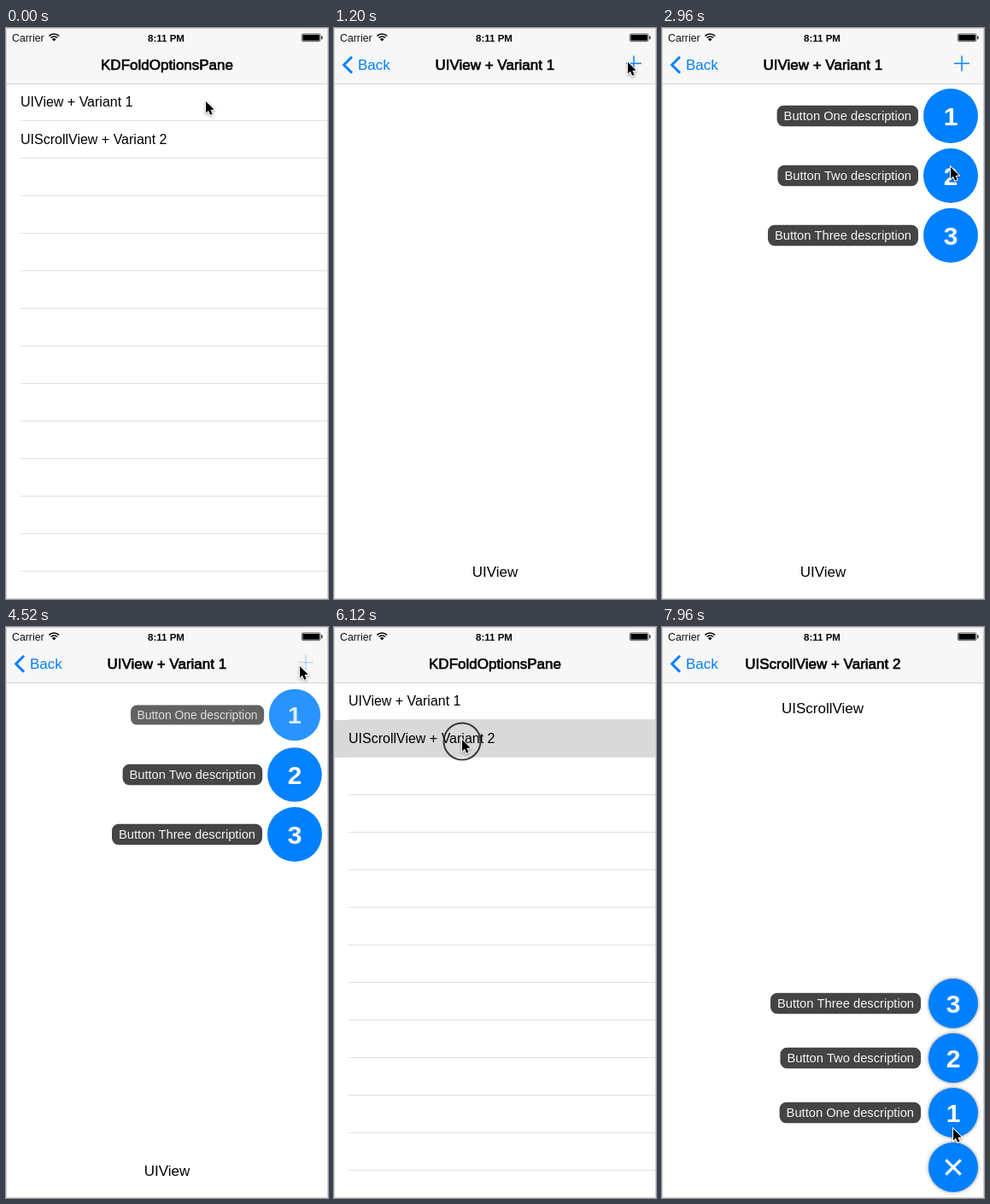
Write an HTML page with a canvas that moves like this. It is 377 px wide and 669 px high and loops after 8 s.

```html
<!DOCTYPE html>
<html lang="en">
<head>
<meta charset="utf-8">
<title>Plus buttons demo</title>
<style>
html, body { margin: 0; width: 100%; height: 100%; overflow: hidden; background: #fff; }
canvas { display: block; }
</style>
</head>
<body>
<canvas id="stage" width="377" height="669"></canvas>
<script>
const W = 377, H = 669, LOOP = 8000;
const BLUE = '#0080ff', PRESSED = '#3399ff', FONT = '"Liberation Sans", Arial, sans-serif';
const ctx = document.getElementById('stage').getContext('2d');

const clamp = v => Math.min(1, Math.max(0, v));
const lerp = (a, b, p) => a + (b - a) * p;
const smooth = p => p * p * (3 - 2 * p);
const ramp = (t, start, length) => clamp((t - start) / length);
const ease = (t, start, length) => smooth(ramp(t, start, length));

// Critically damped spring used by the page transitions
function spring(t, start) {
  const x = Math.max(0, t - start) * 0.01826;
  return 1 - (1 + x) * Math.exp(-x);
}

const PUSH_A = 300, POP = 5308, PUSH_B = 6194;
const OPEN_A = 1480, CLOSE_A = 4445, OPEN_B = 7400;

// Pointer path: time, x, y
const PATH = [
  [0, 234, 86], [340, 234, 86], [1120, 344, 40], [1960, 344, 40], [2600, 337, 100],
  [2800, 337, 100], [2960, 338, 163], [3140, 338, 164], [3400, 338, 246], [3640, 338, 246],
  [4260, 344, 46], [4560, 344, 46], [5120, 51, 42], [5440, 51, 42], [5880, 150, 132],
  [6210, 150, 132], [6600, 244, 660], [7220, 342, 640], [7480, 342, 640], [7920, 341, 588]
];
// Mouse presses: down, up
const CLICKS = {
  rowA: [40, 300], plus: [1340, 1470], one: [2660, 2780], two: [3020, 3120], three: [3440, 3560],
  plusAgain: [4330, 4440], back: [5180, 5300], rowB: [5930, 6190], float: [7270, 7390]
};
const isDown = (name, t) => t >= CLICKS[name][0] && t < CLICKS[name][1];

function text(str, x, y, size, { color = '#000', align = 'left', bold = false, heavy = 0 } = {}) {
  ctx.font = `${bold ? 'bold ' : ''}${size}px ${FONT}`;
  ctx.textAlign = align;
  ctx.fillStyle = ctx.strokeStyle = color;
  ctx.fillText(str, x, y);
  if (heavy) {
    ctx.lineWidth = heavy;
    ctx.lineJoin = 'round';
    ctx.strokeText(str, x, y);
  }
}

function rect(color, x, y, w, h) {
  ctx.fillStyle = color;
  ctx.fillRect(x, y, w, h);
}

function line(points, color, width) {
  ctx.beginPath();
  points.forEach(([x, y], i) => i ? ctx.lineTo(x, y) : ctx.moveTo(x, y));
  ctx.strokeStyle = color;
  ctx.lineWidth = width;
  ctx.lineJoin = 'miter';
  ctx.stroke();
}

function disc(x, y, r, color) {
  ctx.beginPath();
  ctx.arc(x, y, r, 0, Math.PI * 2);
  ctx.fillStyle = color;
  ctx.fill();
}

function layer(alpha, draw) {
  if (alpha <= 0.003) return;
  ctx.save();
  ctx.globalAlpha *= alpha;
  draw();
  ctx.restore();
}

function cross(x, y, arm, width, color, angle = 0) {
  ctx.save();
  ctx.translate(x, y);
  ctx.rotate(angle);
  line([[-arm, 0], [arm, 0]], color, width);
  line([[0, -arm], [0, arm]], color, width);
  ctx.restore();
}

function drawList(t, q) {
  let row = 0, glow = 0;
  if (t >= 6080) { row = 1; glow = 1; }
  else if (t >= 200) glow = 1 - ramp(t, 5480, 320);
  ctx.save();
  ctx.translate(-112 * q, 0);
  rect('#fff', 0, 65, W + 112, H);
  layer(glow, () => rect('#d9d9d9', 0, 65 + row * 44, W, 44));
  for (let y = 108; y < H; y += 44) rect('#e0e0e0', 17, y, W, 1);
  text('UIView + Variant 1', 17, 92, 16);
  text('UIScrollView + Variant 2', 17, 136, 16);
  ctx.restore();
  rect(`rgba(0,0,0,${0.1 * q})`, 0, 65, W, H);
}

// One round button with its description, scaled around the button centre
function drawButton(x, y, r, gap, word, digit, shown, pressed, shadow) {
  layer(shown, () => {
    const scale = lerp(0.65, 1, shown);
    ctx.translate(x, y);
    ctx.scale(scale, scale);
    const label = `Button ${word} description`;
    ctx.font = `14.7px ${FONT}`;
    const w = ctx.measureText(label).width + 16;
    const right = -r - gap;
    ctx.beginPath();
    ctx.roundRect(right - w, -12.3, w, 24.6, 8);
    ctx.fillStyle = '#444';
    ctx.fill();
    text(label, right - 8, 5, 14.7, { color: '#f6f6f6', align: 'right' });
    roundBase(0, 0, r, pressed, shadow);
    text(digit, 0, 11, 30, { color: '#fff', align: 'center', bold: true });
  });
}

function roundBase(x, y, r, pressed, shadow) {
  ctx.save();
  if (shadow) {
    ctx.shadowColor = 'rgba(0,0,0,0.45)';
    ctx.shadowBlur = 4;
  }
  disc(x, y, r, pressed ? PRESSED : BLUE);
  ctx.restore();
}

const WORDS = ['One', 'Two', 'Three'];

function drawPageA(t) {
  text('UIView', 188.5, 643, 17, { align: 'center' });
  WORDS.forEach((word, i) => {
    const shown = ease(t, OPEN_A + i * 55, 300) - ease(t, CLOSE_A + i * 53, 300);
    drawButton(338, 103 + i * 70, 32, 6, word, i + 1, shown, isDown(word.toLowerCase(), t), false);
  });
}

function drawPageB(t) {
  text('UIScrollView', 188, 101, 17, { align: 'center' });
  WORDS.forEach((word, i) => {
    drawButton(341, 569 - i * 64, 29, 9, word, i + 1, ease(t, OPEN_B + i * 80, 300), false, true);
  });
  roundBase(341, 633, 29, isDown('float', t), true);
  cross(341, 633, 12.3, 3.2, '#fff', ease(t, OPEN_B, 340) * Math.PI / 4);
}

function drawPage(t, q, second) {
  const x = 376 * (1 - q);
  if (x > 375.9) return;
  ctx.save();
  ctx.translate(x, 0);
  const shade = ctx.createLinearGradient(-9, 0, 0, 0);
  shade.addColorStop(0, 'rgba(0,0,0,0)');
  shade.addColorStop(1, 'rgba(0,0,0,0.12)');
  if (x > 0.3) rect(shade, -9, 65, 9, H);
  rect('#fff', 0, 65, W, H);
  (second ? drawPageB : drawPageA)(t);
  ctx.restore();
}

function drawStatus() {
  text('Carrier', 7, 15.5, 12.3, { color: '#111' });
  text('8:11 PM', 187.5, 15.5, 11.5, { align: 'center', bold: true });
  for (const r of [8.2, 5.2]) {
    ctx.beginPath();
    ctx.arc(56.2, 15.2, r, -Math.PI * 0.75, -Math.PI * 0.25);
    ctx.strokeStyle = '#000';
    ctx.lineWidth = 1.7;
    ctx.stroke();
  }
  ctx.beginPath();
  ctx.moveTo(56.2, 15.6);
  ctx.arc(56.2, 15.6, 3.3, -Math.PI * 0.75, -Math.PI * 0.25);
  ctx.fillStyle = '#000';
  ctx.fill();
  ctx.beginPath();
  ctx.roundRect(346.4, 6.9, 21.6, 8.8, 1.5);
  ctx.strokeStyle = '#333';
  ctx.lineWidth = 0.8;
  ctx.stroke();
  rect('#000', 347.4, 7.9, 19.6, 6.8);
  rect('#333', 369, 9.5, 1.5, 3.6);
}

function plusAlpha(t) {
  for (const name of ['plus', 'plusAgain']) {
    if (isDown(name, t)) return 0.2;
    const since = t - CLICKS[name][1];
    if (since >= 0 && since < 470) return lerp(0.2, 1, smooth(since / 470));
  }
  return 1;
}

function drawBar(t, q, second) {
  rect('#f7f7f7', 0, 0, W, 65);
  rect('#d2d2d2', 0, 65, W, 1);
  drawStatus();
  const title = { align: 'center', heavy: 0.65 };
  layer((1 - q) ** 3.6, () => text('KDFoldOptionsPane', 188.5 - 93 * q, 49, 17, title));
  layer(q ** 1.7, () => text(`${second ? 'UIScrollView' : 'UIView'} + Variant ${second ? 2 : 1}`,
    188.3 + 224 * (1 - q), 49, 17, title));
  layer(isDown('back', t) ? 0.3 : 1, () => {
    layer(q ** 3.3, () => line([[21, 33.8], [11.6, 43.2], [21, 52.6]], BLUE, 2.9));
    layer(q ** 1.4, () => text('Back', 28 + 108 * (1 - q), 49, 17, { color: BLUE }));
  });
  if (!second) layer(q * plusAlpha(t), () => cross(351, 41.5, 9, 1.5, BLUE));
}

function pointerAt(t) {
  const i = PATH.findIndex(p => p[0] > t);
  if (i < 0) return PATH[PATH.length - 1].slice(1);
  const [t0, x0, y0] = PATH[i - 1], [t1, x1, y1] = PATH[i];
  const p = ease(t, t0, t1 - t0);
  return [lerp(x0, x1, p), lerp(y0, y1, p)];
}

function drawPointer(t) {
  const [x, y] = pointerAt(t);
  ctx.save();
  ctx.translate(x, y);
  if (Object.keys(CLICKS).some(name => isDown(name, t))) {
    ctx.beginPath();
    ctx.arc(0, 2, 21.5, 0, Math.PI * 2);
    ctx.strokeStyle = 'rgba(0,0,0,0.75)';
    ctx.lineWidth = 2;
    ctx.stroke();
  }
  ctx.beginPath();
  [[0, 0], [0, 13.5], [3, 10.8], [5.2, 15.8], [7.6, 14.7], [5.5, 9.9], [9.6, 9.6]]
    .forEach(([px, py]) => ctx.lineTo(px, py));
  ctx.closePath();
  ctx.lineJoin = 'miter';
  ctx.shadowColor = 'rgba(0,0,0,0.4)';
  ctx.shadowBlur = 3;
  ctx.shadowOffsetY = 1;
  ctx.strokeStyle = '#fff';
  ctx.lineWidth = 2;
  ctx.stroke();
  ctx.shadowColor = 'transparent';
  ctx.fillStyle = '#000';
  ctx.fill();
  ctx.restore();
}

function draw(t) {
  const second = t >= PUSH_B;
  const q = second ? spring(t, PUSH_B) : spring(t, PUSH_A) * (1 - spring(t, POP));
  rect('#fff', 0, 0, W, H);
  drawList(t, q);
  drawPage(t, q, second);
  drawBar(t, q, second);
  ctx.strokeStyle = '#d0d0d0';
  ctx.lineWidth = 1;
  ctx.strokeRect(0.5, 0.5, W - 1, H - 1);
  drawPointer(t);
}

const begin = performance.now();
function tick() {
  draw((performance.now() - begin) % LOOP);
  requestAnimationFrame(tick);
}
tick();
</script>
</body>
</html>
```
